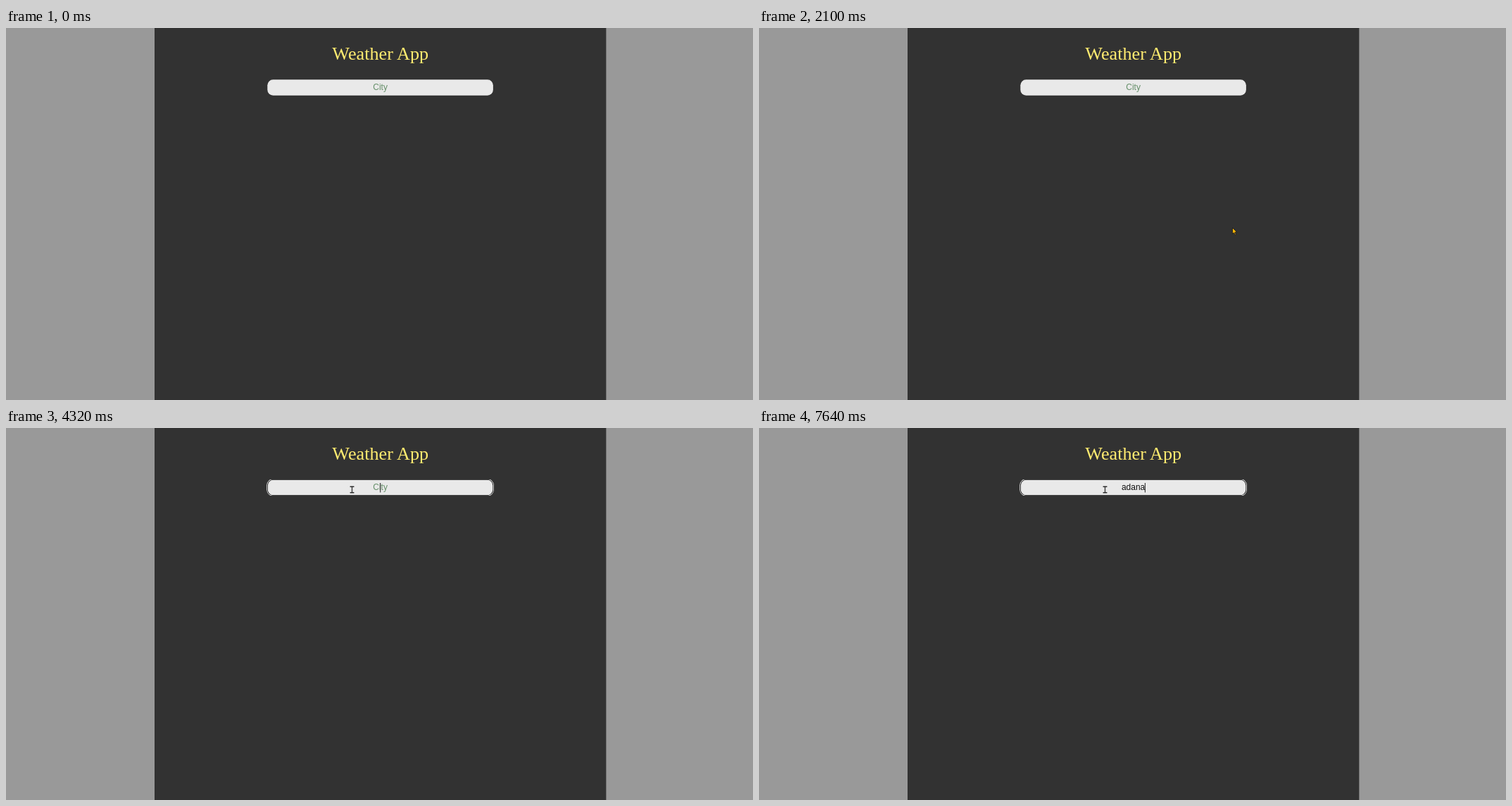
An HTML page that plays this animation: 1061 by 528 pixels, repeating every 8000 ms.

```html
<!DOCTYPE html>
<html lang="en">
<head>
<meta charset="utf-8">
<title>Weather App</title>
<style>
  html, body { margin: 0; width: 100%; height: 100%; overflow: hidden; background: #999; }
  svg { display: block; width: 1061px; height: 528px; }
  text { text-anchor: middle; }
  .title { font: 26.2px "Liberation Serif", "Times New Roman", serif; fill: #ffec70; }
  .field { font: 12px "Liberation Sans", Arial, sans-serif; }
</style>
</head>
<body>
<svg viewBox="0 0 1061 528">
  <clipPath id="band"><rect x="360" y="73" width="345" height="23"/></clipPath>
  <rect width="1061" height="528" fill="#999"/>
  <rect x="211" width="641.4" height="528" fill="#323232"/>
  <text class="title" x="531.7" y="45">Weather App</text>

  <rect x="371.3" y="73.3" width="320.6" height="22.4" rx="8" fill="#e9e9e9"/>
  <g id="ring" clip-path="url(#band)">
    <rect x="370.3" y="72.3" width="322.6" height="24.4" rx="9" fill="#fff"/>
    <rect x="371" y="73" width="321.2" height="23" rx="8.3" fill="#101010"/>
    <rect x="371.8" y="73.7" width="319.6" height="21.6" rx="7.7" fill="#e9e9e9"/>
  </g>
  <text id="value" class="field" x="531.6" y="88"></text>
  <rect id="caret" y="78" width="1" height="13.5" fill="#222"/>

  <path id="arrow" d="M.5 .5V9.3L2.6 7.4L4.1 10.5L5.4 9.9L4 6.9L6.7 6.7Z"
        fill="#ffb508" stroke="#1c1c1c" stroke-width=".9" stroke-linejoin="round"/>
  <g id="beam" fill="none" stroke="#2a2a2a" stroke-width="1.6">
    <path d="M3.5 1.5V9.5" stroke="#4a4a4a"/>
    <path d="M.6 1.2H6.4M.6 9.8H6.4"/>
  </g>
</svg>
<script>
const LOOP = 8000;
const $ = id => document.getElementById(id);
const ring = $('ring'), value = $('value'), caret = $('caret'), arrow = $('arrow'), beam = $('beam');

// Pointer moves: start, step length, last step
const runs = [[500, 69, 11], [1320, 70, 11], [2170, 70, 11], [3010, 70, 9]];

// Pointer path: time, x, y
const path = [
  [500, 1046, 514], [840, 994, 372], [1260, 956, 293], [1600, 928, 261],
  [2090, 672, 283], [2380, 608, 265], [2660, 555.5, 241.5],
  [2940, 533, 216], [3360, 494.5, 112.5], [3640, 490, 85]
];

// Field content: time, text, caret shown
const typing = [
  [0, '', false], [4320, '', true], [5110, '', false], [5970, 'a', true],
  [6300, 'ad', true], [6430, 'adn', true], [7090, 'ad', true],
  [7290, 'ada', true], [7490, 'adan', true], [7640, 'adana', true]
];

const last = (rows, t) => rows.filter(r => r[0] <= t).pop();
const show = (el, on) => el.setAttribute('visibility', on ? 'visible' : 'hidden');
const place = (el, x, y) => el.setAttribute('transform', `translate(${x} ${y})`);

const secant = (i, c) => (path[i + 1][c] - path[i][c]) / (path[i + 1][0] - path[i][0]);

function slope(i, c) {
  if (i === 0) return secant(0, c);
  if (i === path.length - 1) return secant(i - 1, c);
  const a = secant(i - 1, c), b = secant(i, c);
  return a * b > 0 ? 2 * a * b / (a + b) : 0;
}

// Monotone cubic through the path points
function along(t, c) {
  let i = 0;
  while (i < path.length - 2 && t >= path[i + 1][0]) i++;
  const [p, q] = [path[i], path[i + 1]];
  const h = q[0] - p[0], u = Math.min(1, (t - p[0]) / h), v = 1 - u;
  return p[c] * (1 + 2 * u) * v * v + q[c] * u * u * (3 - 2 * u)
       + h * u * v * (slope(i, c) * v - slope(i + 1, c) * u);
}

function draw(t) {
  const run = last(runs, t);
  show(arrow, run && t < 3710);
  if (run) {
    const [start, step, end] = run;
    const s = start + step * Math.min(end, Math.floor((t - start) / step));
    place(arrow, along(s, 1).toFixed(1), along(s, 2).toFixed(1));
  }
  show(beam, t >= 3710);
  place(beam, 488, t < 3840 ? 83 : 82);
  show(ring, t >= 4190);

  const [, text, on] = last(typing, t);
  value.textContent = text || 'City';
  value.setAttribute('fill', text ? '#111' : '#66906a');
  show(caret, on);
  caret.setAttribute('x', text ? 531.2 + value.getComputedTextLength() / 2 : 531.2);
}

const begin = performance.now();
function tick() {
  draw((performance.now() - begin) % LOOP);
  requestAnimationFrame(tick);
}
tick();
</script>
</body>
</html>
```
